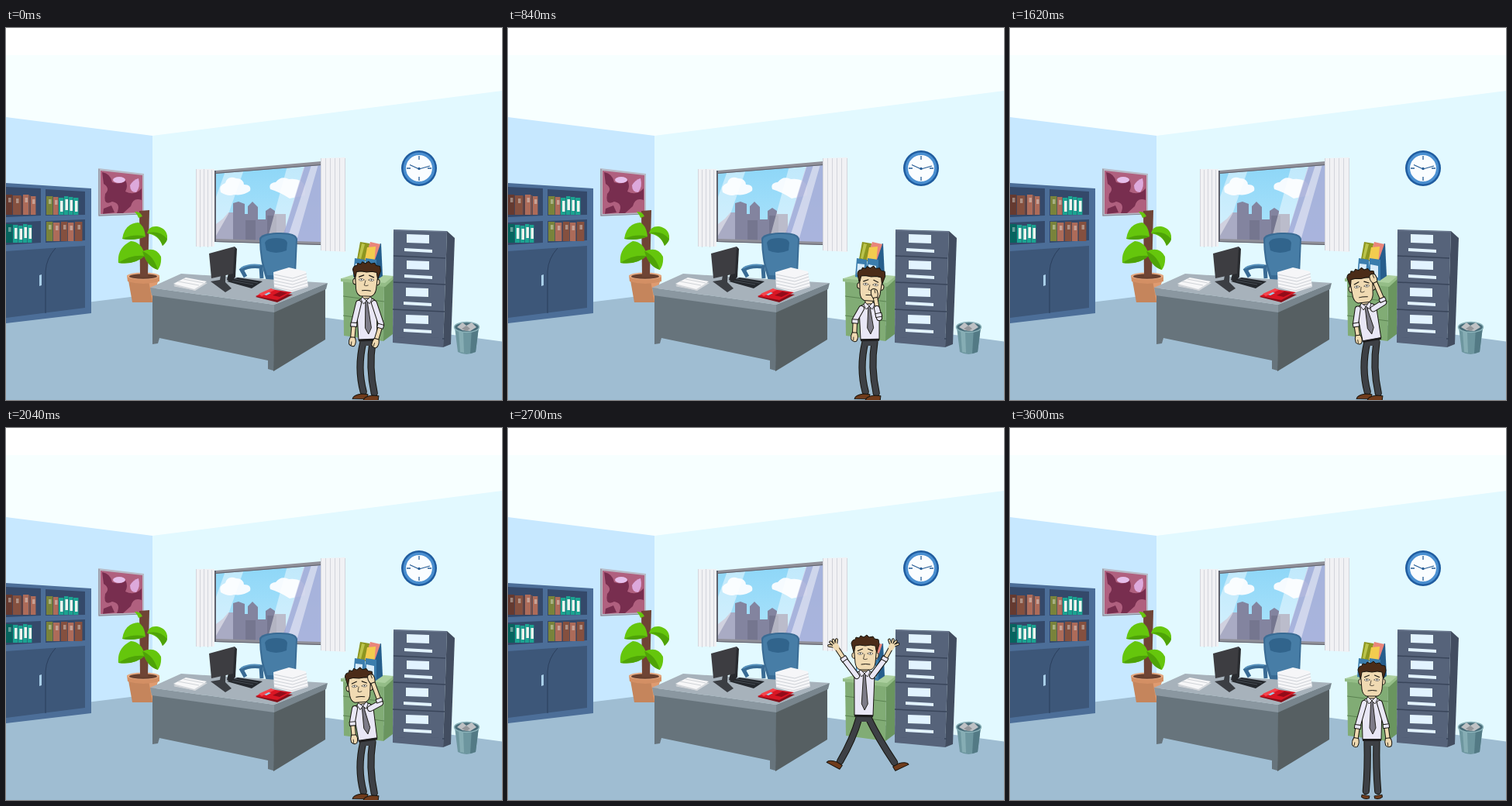
An HTML page with a canvas for the animation above (3750 ms loop, 640 by 480 pixels).

```html
<!DOCTYPE html>
<html lang="en">
<head>
<meta charset="utf-8">
<title>Office worker</title>
<style>
  html, body { margin: 0; width: 100%; height: 100%; overflow: hidden; background: #fff; }
  svg, canvas { position: absolute; left: 0; top: 0; width: 640px; height: 480px; }
</style>
</head>
<body>
<svg viewBox="0 0 640 480">
  <defs>
    <linearGradient id="sky" x2="0" y2="1"><stop stop-color="#8dd6f7"/><stop offset="1" stop-color="#aee4fc"/></linearGradient>
    <clipPath id="pane"><path d="M271 187 406 177V277L271 273Z"/></clipPath>
    <clipPath id="art"><path d="M122 184 176 190V238L122 240Z"/></clipPath>
    <g id="drawer">
      <path fill="#e2f3ff" d="M517 266 546 267V278L517 277Z"/>
      <path fill="#e2f3ff" d="M514 284 550 286V290L514 288Z"/>
      <path stroke="#39455a" stroke-width="1.5" d="M500 294 567 297"/>
    </g>
  </defs>

  <!-- room -->
  <path fill="#fff" d="M0 0H640V36H0Z"/>
  <path fill="#f7ffff" d="M0 35H640V150H0Z"/>
  <path fill="#c7e8ff" d="M0 115 189 139V346L0 372Z"/>
  <path fill="#e2f9ff" d="M189 139 640 81V406L189 346Z"/>
  <path fill="#9fbdd2" d="M0 367 189 343.500 640 404.500V480H0Z"/>

  <!-- bookcase -->
  <path fill="#4c6e98" d="M0 200 110 207V368L0 381Z"/>
  <path fill="#34496a" d="M0 205 45 207V242L0 244ZM51 208 102 211V241L51 242ZM0 251 45 249V277L0 280ZM51 249 102 247V274L51 277Z"/>
  <g id="books"></g>
  <path fill="#3d5779" d="M0 288 102 281V361L0 374Z"/>
  <path fill="#39527400" d="M64 284 102 281V361L51 368V314Q53 295 64 284Z"/>
  <path fill="none" stroke="#2b3f5d" d="M64 284Q52 297 51 314V368"/>
  <path fill="#a9cfe8" d="M43 319 46 318V332L43 333Z"/>

  <!-- picture -->
  <path fill="#b8bac6" d="M119 181 178 188V240L119 243Z"/>
  <path fill="none" stroke="#858898" d="M120 182V242L178 240"/>
  <g clip-path="url(#art)">
    <path fill="#b0607f" d="M120 180H180V245H120Z"/>
    <path fill="#782e4f" d="M124 186Q135 188 137 199Q147 203 154 196Q158 204 154 211Q166 217 175 207V222Q164 218 161 230L151 239H143Q149 226 137 224Q125 230 128 214Q135 207 126 201Z"/>
    <ellipse cx="146" cy="196" rx="8" ry="4" fill="#e5bfeb"/>
    <path fill="#dda9dc" d="M160 203Q164 196 171 194Q174 205 168 212Q160 212 160 203Z"/>
    <path fill="#782e4f" d="M126 233 136 229 140 238 125 240Z"/>
  </g>

  <!-- plant -->
  <path fill="#6f4435" d="M172 236 185 235 183 320H173Z"/>
  <path fill="#65c60c" d="M166 237Q173 236 176 243L171 245Q169 240 166 237ZM180 269Q166 275 150 272Q153 252 171 251Q179 256 180 269ZM182 265Q184 255 195 256Q209 259 208 272L202 281Q197 267 182 265ZM179 294Q166 306 145 303Q143 284 161 275Q176 276 179 294ZM176 288Q193 281 200 295Q201 305 196 312Q182 308 176 288Z"/>
  <path fill="#4ea307" d="M180 269Q166 275 150 272Q166 265 180 269ZM182 265Q196 264 202 281Q208 276 208 272Q197 260 182 265ZM179 294Q166 306 145 303Q161 292 179 294ZM176 288Q190 293 196 312Q182 308 176 288Z"/>
  <path fill="#c5855c" d="M158 326H196L189 354H163Z"/>
  <path fill="#df9b70" d="M184 326H196L189 354Z"/>
  <path fill="#d38f64" d="M156 319H198V327Q177 333 157 327Z"/>
  <ellipse cx="177" cy="320" rx="21" ry="4.5" fill="#e5aa83"/>
  <ellipse cx="177" cy="320.5" rx="18" ry="3.3" fill="#68402f"/>
  <path fill="#6f4435" d="M173 308H183V321H173Z"/>

  <!-- window -->
  <g clip-path="url(#pane)">
    <path fill="url(#sky)" d="M271 175H407V279H271Z"/>
    <path fill="#f6fbff" d="M277 212Q274 203 283 200Q286 190 297 194Q306 194 307 202Q317 202 315 210Q306 217 294 215Q287 218 277 212ZM341 208Q338 200 348 199Q355 190 365 195Q382 193 386 205V216L366 220Q354 212 341 208Z"/>
    <path fill="#a9abc4" d="M271 275V253L280 246 287 238H294V275Z"/>
    <path fill="#83849f" d="M293 275V226L300 224 308 227V240H312V230L318 224 325 231V247H335V236L341 232 347 236V240H361V277Z"/>
    <path fill="#75768f" d="M309 275V248H322V275ZM337 275V242H349V275Z"/>
    <path fill="#a9b0da" fill-opacity=".9" d="M385 177H408V279H354Z"/>
    <path fill="#fff" fill-opacity=".45" d="M283 185 307 183 287 240 271 268V218ZM363 178 386 177 363 251 354 277 337 274ZM394 177 403 176 374 278H361Z"/>
  </g>
  <path fill="#909099" d="M270 184 407 172V177L270 188ZM270 272 407 276V280L270 276Z"/>
  <path fill="#5f616c" d="M270 187 407 176V177L270 188ZM270 275 407 279V280L270 276ZM269 184H271V276H269Z"/>
  <path fill="#f1f1f4" d="M245 182H269V282H245ZM406 168 438 167V289L406 287Z"/>
  <path fill="none" stroke="#d3d5dc" d="M245.500 182V282M250.500 183V283M255.500 182V282M260.500 183V283M265.500 183V282M406.500 168V287M412.500 168V288M418.500 168V288M424.500 168V288M430.500 168V288M437.500 168V288"/>

  <!-- clock -->
  <circle cx="533" cy="181" r="23" fill="#1f5c9f"/>
  <circle cx="533" cy="181" r="18.700" fill="#fafdff" stroke="#4a8fd0" stroke-width="3.500"/>
  <path fill="none" stroke="#275d96" stroke-width="1.300" d="M533 165V170M533 192V197M517 181H522M544 181H549M533 182 521 176.500M533 182 547 178"/>
  <circle cx="533" cy="181.500" r="1.700" fill="#275d96"/>

  <!-- green cabinet and file holder -->
  <path fill="#acd09f" d="M433 323 455 316 500 320 489 332Z"/>
  <path fill="#81ac75" d="M435 327 488 332 487 404 436 397Z"/>
  <path fill="#6a955f" d="M488 332 500 321 499 395 487 404Z"/>
  <path fill="#94bd87" d="M432 323 489 329 500 320V324L489 334 432 327Z"/>
  <path fill="none" stroke="#5b8351" d="M435 346 488 353M435 371 488 378"/>
  <path fill="#265e8c" d="M462 287 484 278 486 320 477 326Z"/>
  <path fill="#8d9620" d="M457 276 469 278 467 302 453 298Z"/>
  <path fill="#bbc44b" d="M459 278 463 279 458 298 455 297Z"/>
  <path fill="#e9867b" d="M470 276 483 279 475 302 463 299Z"/>
  <path fill="#f3cc4f" d="M466 283 477 282 475 304 463 299Z"/>
  <path fill="#3b7dad" d="M450 297 463 299V324L448 321ZM464 297 478 299V326L462 324Z"/>
  <path fill="#d8ecfa" d="M451 304 460 305 459 320 450 318ZM465 305 475 307V322L465 320Z"/>

  <!-- filing cabinet -->
  <path fill="#56637a" d="M500 260 569 262 564 412 499 406Z"/>
  <path fill="#424d60" d="M569 262 579 271 574 408 564 412Z"/>
  <path fill="none" stroke="#6e7b92" d="M500 261 569 263"/>
  <use href="#drawer"/><use href="#drawer" y="34"/><use href="#drawer" x="-1" y="69"/><use href="#drawer" x="-1" y="104"/>
  <path fill="#56637a" d="M499 396 563 400V403L499 399Z"/>

  <!-- bin -->
  <path fill="#6d969f" d="M579 386H610L606 418Q594 424 583 418Z"/>
  <path fill="#86adb4" d="M584 391 590 393 591 419 586 418Z"/>
  <path fill="#537a85" d="M601 386H610L606 418 599 420Z"/>
  <ellipse cx="594.500" cy="386" rx="16" ry="6.500" fill="#486c79" stroke="#8cb4bb" stroke-width="1.500"/>
  <path fill="#bec1c4" d="M582 386 589 380 594 384 601 380 607 386 599 391 589 390Z"/>
  <path fill="#94979b" d="M588 388 594 384 599 388 594 391Z"/>

  <!-- chair -->
  <path fill="#396b94" d="M327 272Q328 265 350 264Q374 263 376 272L374 317 366 326H336Q327 300 327 272Z"/>
  <path fill="#477da6" d="M329 273Q331 267 350 266Q373 265 374 273L372 319H337Q329 297 329 273Z"/>
  <path fill="#31648c" d="M334 277Q336 271 349 271Q362 271 363 277L362 287Q348 293 336 287Z"/>
  <path fill="none" stroke="#396b94" stroke-width="5" d="M330 323 329 308Q313 306 304 312L309 321"/>
  <path fill="none" stroke="#5690bb" stroke-width="2" d="M328 306Q313 304 303 310"/>

  <!-- desk -->
  <path fill="#67747c" d="M189 343 347 364 345 442 338 440V429L198 400 196 407 189 408Z"/>
  <path fill="#565f62" d="M346 364 412 336V402L345 443Z"/>
  <path fill="#a7b2bb" d="M186 335 226 317 415 329 346 357Z"/>
  <path fill="#8a97a0" d="M186 335 346 357V367L188 345Z"/>
  <path fill="#78858d" d="M346 357 415 329 413 337 346 367Z"/>

  <!-- things on the desk -->
  <path fill="#d4d7db" d="M216 332 231 325 260 329 244 339Z"/>
  <path fill="#f7f7f8" d="M216 330 232 322 259 327 243 337Z"/>
  <path fill="none" stroke="#d0d3d7" d="M217 333 243 338M222 327 249 332M229 324 255 329"/>
  <path fill="#24282d" d="M285 327 299 322 331 327 317 336Z"/>
  <path fill="none" stroke="#454b52" d="M290 326 319 331M295 324 325 329"/>
  <path fill="#3b3e43" d="M264 327 276 325 279 308 284 310 283 328 291 336 283 341Z"/>
  <path fill="#292b2f" d="M295 282 298 285 296 321 291 328 285 325Z"/>
  <path fill="#3d3d41" d="M262 291 295 282 293 317 265 323Z"/>
  <path fill="#f6f6f8" d="M345 315 365 309 387 314 390 334 368 341 346 335Z"/>
  <path fill="none" stroke="#c4c8ce" stroke-width=".8" d="M346 318 370 323 388 317M346 322 370 327 388 321M346 326 370 331 389 325M346 330 369 335 389 329M346 334 368 339 390 333"/>
  <path fill="#85101a" d="M322 347 334 340 370 344 350 354Z"/>
  <path fill="#d91624" d="M322 346 341 337 369 341 350 351Z"/>
  <path fill="#f5434b" d="M326 343 342 336 347 338 330 346Z"/>
  <path fill="#930b18" d="M344 345 354 340 363 342 353 347Z"/>
  <path fill="#9bd4ed" d="M333 344 339 341 342 342 336 345Z"/>
</svg>
<canvas id="man" width="640" height="480"></canvas>

<script>
// Each book is a colour key followed by its width.
const INK = { b: '#85503f', r: '#ad6b59', d: '#653a30', t: '#1ba391', g: '#07645f', o: '#79833b' };
const rows = [
  { top: 215, end: 241, x: 0, list: 'd9 b11 d2 r8 b2 r7' },
  { top: 217, end: 241, x: 52, list: 'o9 r7 t7 t6 t6 t7' },
  { top: 253, end: 277, x: 0, list: 'g9 t7 t6 t6 t6' },
  { top: 250, end: 275, x: 52, list: 'o9 r9 d1 b9 r8 d1 b10' }
];
document.getElementById('books').innerHTML = rows.map(row => {
  let x = row.x;
  return row.list.split(' ').map((item, i) => {
    const w = +item.slice(1), y = row.top + i % 3, left = x, teal = item[0] === 't';
    x += w;
    const label = w > 4 ? `<rect x="${left + w / 2 - 1.5}" y="${y + 4}" width="3.500" height="${teal ? 14 : 6}" fill="#eef3ee" fill-opacity="${teal ? 1 : .4}"/>` : '';
    return `<rect x="${left}" y="${y}" width="${w - .6}" height="${row.end - y}" fill="${INK[item[0]]}"/>${label}`;
  }).join('');
}).join('');

const ctx = document.getElementById('man').getContext('2d');
const LINE = '#17150f', SKIN = '#f0dab2', SHIRT = '#e9e7f6', PANTS = '#3d4045', SHOE = '#703c1c';

// Joints are [x, y]; toes are the shoe directions in degrees.
const stand = {
  head: [467, 324], neck: [467, 349], hip: [467, 402], tilt: [0], open: [0],
  elbowL: [449, 383], handL: [446, 404], elbowR: [485, 382], handR: [488, 404],
  kneeL: [461, 438], footL: [459, 474], kneeR: [473, 438], footR: [475, 474], toes: [100, 80]
};
const turned = {
  ...stand, head: [465, 324], neck: [465, 349], tilt: [2],
  elbowL: [449, 380], handL: [447, 403], elbowR: [484, 382], handR: [477, 405],
  kneeL: [457, 438], footL: [462, 475], kneeR: [471, 438], footR: [476, 477], toes: [178, 178]
};
const wipe = {
  ...turned, head: [468, 330], neck: [466, 356], tilt: [4],
  elbowL: [448, 376], handL: [447, 397], elbowR: [479, 374], handR: [472, 344]
};
const scratch = {
  ...turned, head: [451, 333], neck: [457, 357], tilt: [-10],
  elbowL: [445, 383], handL: [450, 401], elbowR: [481, 353], handR: [466, 320]
};
const ponder = {
  ...scratch, head: [456, 332], neck: [460, 356], tilt: [-3],
  elbowL: [447, 379], handL: [449, 400], elbowR: [483, 355], handR: [472, 325]
};
const star = {
  ...stand, head: [461, 290], neck: [460, 314], hip: [459, 371], open: [1],
  elbowL: [435, 300], handL: [423, 282], elbowR: [485, 300], handR: [495, 282],
  kneeL: [443, 402], footL: [426, 435], kneeR: [480, 402], footR: [502, 437], toes: [205, -22]
};
const squat = {
  ...stand, head: [464, 353], neck: [464, 378], hip: [465, 427], open: [1],
  elbowL: [430, 381], handL: [415, 363], elbowR: [496, 384], handR: [513, 366],
  kneeL: [458, 452], footL: [456, 477], kneeR: [473, 452], footR: [474, 477]
};

const keys = [
  [0, turned], [120, turned], [420, wipe], [900, wipe], [1110, turned],
  [1260, scratch], [1500, ponder], [1770, scratch], [2040, ponder], [2100, ponder],
  [2220, stand], [2430, squat], [2700, star], [2910, squat], [3030, star],
  [3180, squat], [3420, stand], [3600, stand]
];

function poseAt(t) {
  let i = 0;
  while (i < keys.length - 2 && t >= keys[i + 1][0]) i++;
  const [t0, a] = keys[i], [t1, b] = keys[i + 1];
  const u = Math.min(1, (t - t0) / (t1 - t0)), k = u * u * (3 - 2 * u);
  const pose = {};
  for (const name in a) pose[name] = a[name].map((v, j) => v + (b[name][j] - v) * k);
  if (t >= 420 && t < 900) pose.handR[0] += 1.5 * Math.sin((t - 480) / 50);
  if (t >= 1260 && t < 2100) pose.handR[1] += 2.5 * Math.sin((t - 1260) * Math.PI / 130);
  return pose;
}

function shape(d, fill, width = 1) {
  const path = new Path2D(d);
  if (fill) { ctx.fillStyle = fill; ctx.fill(path); }
  if (width) { ctx.strokeStyle = LINE; ctx.lineWidth = width; ctx.stroke(path); }
}

// Two points give a straight limb, three a smooth bend through the middle one.
function limb([a, b, c], width, color) {
  const bend = c && b.map((v, i) => 2 * v - (a[i] + c[i]) / 2);
  const path = new Path2D(c ? `M${a}Q${bend} ${c}` : `M${a}L${b}`);
  for (const [w, ink] of [[width + 2, LINE], [width, color]]) {
    ctx.lineWidth = w;
    ctx.strokeStyle = ink;
    ctx.stroke(path);
  }
}

function at([x, y], angle, draw) {
  ctx.save();
  ctx.translate(x, y);
  ctx.rotate(angle);
  draw();
  ctx.restore();
}

const mix = (a, b, k) => a.map((v, i) => v + (b[i] - v) * k);
const heading = (a, b) => Math.atan2(b[1] - a[1], b[0] - a[0]);

function leg(hip, knee, foot, toe) {
  const a = toe * Math.PI / 180, side = Math.cos(a) < 0 ? -1 : 1;
  limb([hip, knee, mix(foot, knee, .15)], 7.2, PANTS);
  at(foot, a, () => {
    ctx.scale(1, side);
    if (Math.abs(Math.cos(a)) < .5) shape('M0 -5L3 -5Q6 0 3 5L0 5Z', SHOE);
    else shape('M-5 -2L3 -3Q14 -2 15 3L-4 4Z', SHOE);
  });
}

function arm(shoulder, elbow, hand, open) {
  const a = heading(elbow, hand);
  limb([elbow, hand], 4.4, SKIN);
  at(hand, a, () => {
    if (open > .5) {
      for (const f of [-.85, -.3, .2, .7]) limb([[0, 0], [9 * Math.cos(f), 9 * Math.sin(f)]], 1.8, SKIN);
      shape('M-4 -3Q2 -5 4 -2L4 3Q0 5 -4 3Z', SKIN, 0);
    } else {
      shape('M-4 -3Q2 -6 7 -3Q9 1 5 4Q0 5 -4 3Z', SKIN);
      shape('M2 1L6 1', null, .8);
    }
  });
  limb([shoulder, elbow], 6, SHIRT);
  at(mix(elbow, hand, .12), a, () => shape('M-2.500 -4L2.500 -4L2.500 4L-2.500 4Z', SHIRT));
}

function torso(neck, hip) {
  const len = Math.hypot(hip[0] - neck[0], hip[1] - neck[1]);
  at(neck, heading(neck, hip) - Math.PI / 2, () => {
    shape('M-5 -7L5 -7L5 3L-5 3Z', SKIN);
    shape(`M-6 0L6 0Q12 1 13 8L12 ${len}L-12 ${len}L-13 8Q-12 1 -6 0Z`, SHIRT);
    shape(`M-2 3L2 3L1.500 8L5 ${len - 15}L1 ${len - 7}L-3 ${len - 15}L-1.500 8Z`, '#7d7b87', .9);
    shape('M-5 -2L0 3L-4 7L-7 1ZM5 -2L0 3L4 7L7 1Z', SHIRT, .8);
    shape(`M-12 ${len - 1}L12 ${len - 1}L12 ${len + 2}L-12 ${len + 2}Z`, '#1d1c1d', 0);
  });
}

function head() {
  shape('M-14 0Q-18 -1 -17 5Q-16 8 -13 7ZM14 0Q18 -1 17 5Q16 8 13 7Z', SKIN);
  shape('M-15 -10L-13 13Q-12 20 -7 22L7 22Q12 20 13 13L15 -10Z', SKIN);
  shape('M-15 -1L-18 -12Q-17 -17 -13 -17L-12 -20L-8 -19L-6 -22L-2 -20L2 -23L5 -20L10 -21L12 -18L17 -17L18 -11L15 -1L14 -3L13 -9L7 -10L0 -9L-7 -10L-13 -9L-14 -3Z', '#4b2c18');
  for (const s of [-1, 1]) {
    ctx.save();
    ctx.scale(s, 1);
    shape('M3 1Q6 -2 10 1Q7 4 3 1Z', '#fbf7ee', .5);
    shape('M6 0L7 0L7 1.500L6 1.500Z', LINE, 0);
    shape('M3.500 -5L9.500 -2.500', null, 1.2);
    ctx.restore();
  }
  shape('M-1 2L-2.500 8Q0 9.500 2.500 8', null, .7);
  shape('M-5 15Q0 14 6 15', null, 1);
}

function render(t) {
  const p = poseAt(t), open = p.open[0];
  ctx.clearRect(0, 0, 640, 480);
  ctx.lineJoin = ctx.lineCap = 'round';
  const off = (pt, x, y) => [pt[0] + x, pt[1] + y];
  leg(off(p.hip, -6, 3), p.kneeL, p.footL, p.toes[0]);
  leg(off(p.hip, 6, 3), p.kneeR, p.footR, p.toes[1]);
  shape(`M${off(p.hip, -10, 1)}L${off(p.hip, 10, 1)}L${off(p.hip, 7, 8)}L${off(p.hip, -7, 8)}Z`, PANTS, 0);
  torso(p.neck, p.hip);
  at(p.head, p.tilt[0] * Math.PI / 180, head);
  arm(off(p.neck, -10, 6), p.elbowL, p.handL, open);
  arm(off(p.neck, 10, 6), p.elbowR, p.handR, open);
}

const LOOP = 3750, STEP = 30, LAST = 3600;
let start = null;
function tick(now) {
  if (start === null) start = now;
  const t = (now - start) % LOOP;
  render(Math.min(LAST, Math.floor(t / STEP) * STEP));
  requestAnimationFrame(tick);
}
render(0);
requestAnimationFrame(tick);
</script>
</body>
</html>
```
